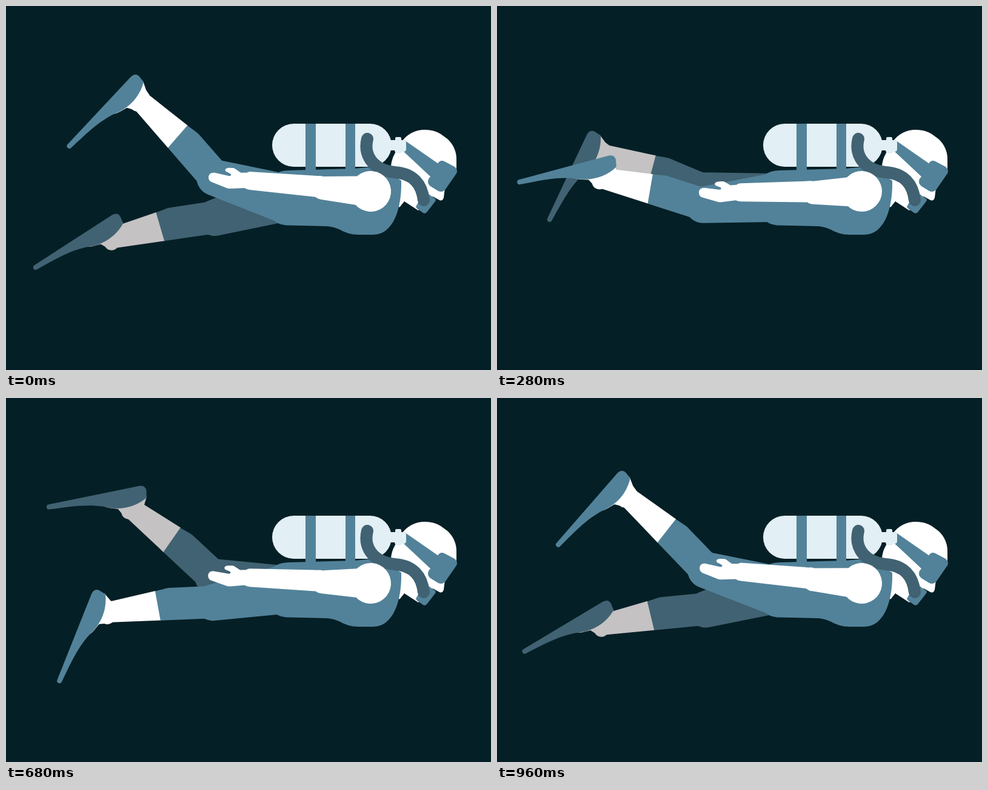
An HTML page that plays this animation: 800x600 px, repeating every 1000 ms.

```html
<!DOCTYPE html>
<html lang="en">
<head>
<meta charset="utf-8">
<title>Diver</title>
<style>
  html, body { margin: 0; width: 100%; height: 100%; overflow: hidden; background: #051f26; }
  svg { display: block; width: 100vw; height: 100vh; --suit: #528299; --skin: #fff; }
  #far { --suit: #416272; --skin: #c4c2c3; }
  .suit { fill: var(--suit); }
  .skin { fill: var(--skin); }
  .pale { fill: #e2eff4; }
  .hose { fill: none; stroke: #416272; stroke-width: 20; stroke-linecap: round; }
</style>
</head>
<body>
<svg viewBox="0 0 800 600">
  <defs>
    <path id="thigh" class="suit" d="M336 286.2 L450 276.3 A40 40 0 0 1 450 355.7 L336 345.8 A30 30 0 0 1 336 286.2 Z"/>
    <g id="shin">
      <path class="skin" d="M299.5 197 L237 148 L226 152 L210 164 L213 172 L267.5 234.5 Z"/>
      <path class="suit" d="M299 197 L314 208 Q318 211 321 215 L365 265 L344 283 L322 297 L267 234 Z"/>
    </g>
    <g id="foot">
      <circle class="skin" cx="216" cy="162" r="12"/>
      <path class="skin" d="M226 124 L231 139 L237 148 L226 164 L213 172 L199 168 L188 174 Q183 177 176 178 L205 140 Z"/>
      <path class="suit" d="M227 126 L220.5 117 Q214 109.5 206 117 L100.8 227.4 A4 4 0 0 0 106.5 233.2 C135 207 153 190 178 178 C205 168 221 148 227 126 Z"/>
    </g>
  </defs>

  <rect width="800" height="600" fill="#051f26"/>
  <g id="far"></g>

  <rect class="pale" x="439" y="194" width="197" height="71" rx="35.5"/>
  <rect class="suit" x="494" y="194" width="17" height="80"/>
  <rect class="suit" x="560" y="194" width="16" height="80"/>

  <path class="skin" d="M652 225 C661 211 675 204 691 204 Q706 204 717 211 L728 219 C738 228 743 240 743 252 L743 268 L724 300 L722 316 Q720 322 715 320 L704 314 L680 337 L657 322 L649 332 L630 300 L635 264 Q636 252 642 242 Z"/>
  <path class="suit" d="M657 221 L716 262 L702 283 L656 240 Z"/>
  <path class="suit" d="M712 260 Q716 253 723 256 L740 265 Q746 270 743 276 L725 302 Q720 308 713 305 L700 297 Q694 292 697 285 L701 280 Z"/>
  <path class="pale" d="M634 221 H642 V218 Q642 216 644 216 H650 Q652 216 652 218 V221 H656 Q660 221 660 225 V236 Q660 240 656 240 H653 Q652 243 649 243 H645 Q642 243 641 238 H634 Z"/>

  <path class="suit" d="M434 300 Q434 272 465 271 L575 268 L606 265 L640 280 L652 288 C653 332 640 377 605 377 L582 377 C556 377 552 364 528 363 L462 361.5 Q448 361 434 347 Z"/>
  <g id="near"></g>
  <path class="suit" d="M676 331 L690 305 L707 317 Q710 319 708 322 L694 340 Q691 343 688 341 L678 334 Z"/>
  <path class="hose" d="M596 219 C590 243 602 270 641 274 C672 276 686 294 689 320"/>

  <g id="arm" class="skin">
    <circle cx="601.5" cy="305.5" r="33.5"/>
    <path d="M590 281 L577 283 L521 290 Q517 289 512 290 L402 295.5 Q398 295.5 395 298 L385 299 L375 293.5 Q373 292.5 371 292.7 L364 293.3 Q359 294.5 359 297.5 Q360 300.5 364 301 L369 303 Q371 306 367 306.5 L342 304 Q334 304 333 311 Q333 317 338 319.5 L364 326.5 Q367 327.5 371 327 L394 323.5 Q398 325.5 403 325.5 L512 325 Q516 328 522 328 L590 331 Z"/>
  </g>
</svg>
<script>
const LOOP = 1000, STEP = 40, RAD = Math.PI / 180;
const HIP = [455, 316], KNEE = [344.3, 283], ANKLE = [216, 163];
const SHIN_REST = 48, FIN_REST = 133.2;

// a cosine swing with sharpened middle; sag lowers it between the extremes
function swing(phase, size, sharp, sag) {
  const c = Math.cos(phase), s = Math.sin(phase);
  return size * c - sharp * Math.cos(3 * phase) - sag * s * s;
}

// the fin flicks quickly at each turn of the kick and eases back between: time, degrees
const FLICK = [[0, -7], [100, 24], [200, 29.5], [440, 11.4], [600, -2], [720, -36], [960, -9]];

function flick(t) {
  const n = FLICK.length;
  const key = i => [FLICK[(i + n) % n][0] + LOOP * Math.floor(i / n), FLICK[(i + n) % n][1]];
  let i = n - 1;
  while (key(i)[0] > t) i--;
  const [a, b, c, d] = [-1, 0, 1, 2].map(k => key(i + k));
  const slope = (p, q) => (q[1] - p[1]) / (q[0] - p[0]);
  const h = c[0] - b[0], u = (t - b[0]) / h, v = 1 - u;
  return b[1] * v * v * (1 + 2 * u) + c[1] * u * u * (3 - 2 * u)
    + h * u * v * (slope(a, c) * v - slope(b, d) * u);
}

function turn([x, y], degrees) {
  const c = Math.cos(degrees * RAD), s = Math.sin(degrees * RAD);
  return [x * c - y * s, x * s + y * c];
}
const add = (p, q) => [p[0] + q[0], p[1] + q[1]];
const sub = (p, q) => [p[0] - q[0], p[1] - q[1]];

// side is 1 for the near leg and -1 for the far one, which mirrors it
function makeLeg(id, side) {
  const [shin, foot, thigh] = ['shin', 'foot', 'thigh'].map(part => {
    const el = document.createElementNS('http://www.w3.org/2000/svg', 'use');
    el.setAttribute('href', '#' + part);
    return document.getElementById(id).appendChild(el);
  });
  const put = (el, at, angle, from) => el.setAttribute('transform',
    `translate(${at}) rotate(${angle}) translate(${-from[0]} ${-from[1]})`);
  return t => {
    const phase = t / LOOP * 2 * Math.PI;
    const lift = side * swing(phase, 18.1, 1.5, 1.7);
    const bend = 19.5 + side * swing(phase - 0.24, 30.5, 1, 4.3) - SHIN_REST;
    const fin = 139.7 + side * flick(t) - FIN_REST;
    const knee = add(HIP, turn([-115.5, 0], lift));
    const ankle = add(knee, turn(sub(ANKLE, KNEE), bend));
    put(thigh, HIP, lift, HIP);
    put(shin, knee, bend, KNEE);
    put(foot, ankle, fin, ANKLE);
  };
}

const farLeg = makeLeg('far', -1), nearLeg = makeLeg('near', 1);
const arm = document.getElementById('arm');
const start = performance.now();

function draw(now) {
  const t = Math.floor(Math.max(0, now - start) % LOOP / STEP) * STEP;
  farLeg(t);
  nearLeg(t);
  const sway = 3.5 + 3.6 * Math.cos(t / LOOP * 2 * Math.PI + 0.61);
  arm.setAttribute('transform', `rotate(${sway} 601.5 306)`);
  requestAnimationFrame(draw);
}
draw(start);
</script>
</body>
</html>
```
